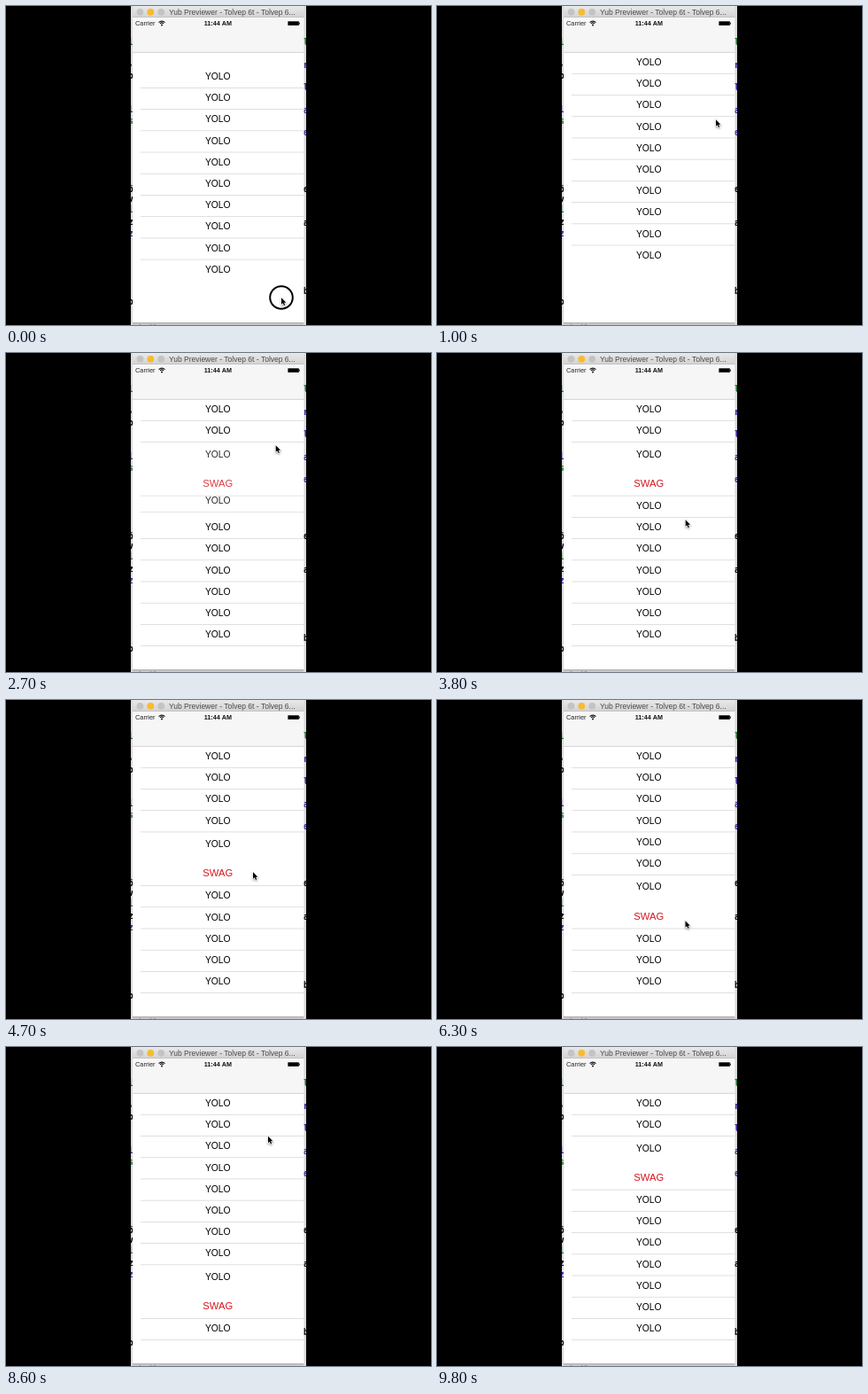
Animation of 480x360 px, one loop 10 s. Source, as an HTML page with a canvas:

```html
<!DOCTYPE html>
<html>
<head>
<meta charset="utf-8">
<style>
html, body { margin: 0; width: 100%; height: 100%; overflow: hidden; background: #000; }
canvas { display: block; }
</style>
</head>
<body>
<canvas id="stage" width="480" height="360"></canvas>
<script>
const ctx = document.getElementById('stage').getContext('2d');
const LOOP = 10000, FADE = 310;
const ROWS = 10, ROW_H = 24.22, EXTRA = 36.4, TABLE_TOP = 52.1;
const SANS = '"Liberation Sans", Arial, sans-serif';
const MONO = '"DejaVu Sans Mono", monospace';

// [time, row opened by the tap]
const taps = [[1300, 3], [2470, 2], [4200, 4], [5700, 6], [7350, 8], [8950, 2]];
// [time, x, y] of the pointer tip
const pointer = [
  [0, 311, 329], [250, 311, 329], [950, 315, 128], [1500, 315, 128], [2250, 304.7, 104],
  [3000, 304.7, 104], [3950, 279, 194], [4750, 279, 194], [5500, 280.5, 249],
  [6350, 280.5, 249], [7150, 284, 294], [7650, 284, 294], [8450, 296, 100.5],
  [9200, 296, 100.5], [9700, 348, 72]
];
// [letter, baseline, colour] of the editor showing beside the window
const GREEN = '#1f7a30', PURPLE = '#4a22a8', INK = '#000';
const leftCode = [['l', 44, GREEN], [',', 68, INK], ['o', 82, INK], ['l', 120, PURPLE],
  ['s', 133, GREEN], ['ö', 210, INK], ['v', 221, INK], ['l', 233, GREEN],
  ['z', 247, INK], ['z', 260, PURPLE], ['o', 337, INK]];
const rightCode = [['l', 44, GREEN], ['r', 70, PURPLE], ['l', 95, PURPLE], ['a', 121, PURPLE],
  ['e', 146, PURPLE], ['e', 210, INK], ['a', 248, INK], ['b', 325, INK]];

const clamp = v => Math.max(0, Math.min(1, v));
const ease = v => { v = clamp(v); return v * v * (3 - 2 * v); };

function rect(x, y, w, h, color) {
  ctx.fillStyle = color;
  ctx.fillRect(x, y, w, h);
}

function disc(x, y, r, color) {
  ctx.fillStyle = color;
  ctx.beginPath();
  ctx.arc(x, y, r, 0, 7);
  ctx.fill();
}

function text(str, x, y, size, color, align = 'center', weight = '', family = SANS) {
  ctx.font = `${weight} ${size}px ${family}`;
  ctx.textAlign = align;
  ctx.fillStyle = color;
  ctx.fillText(str, x, y);
}

function gradient(y0, y1, from, to) {
  const g = ctx.createLinearGradient(0, y0, 0, y1);
  g.addColorStop(0, from);
  g.addColorStop(1, to);
  return g;
}

function drawDesktop() {
  rect(141, 0, 198, 360, '#dadada');
  for (const [ch, y, color] of leftCode) text(ch, 144, y, 10.5, color, 'right', 'bold', MONO);
  for (const [ch, y, color] of rightCode) text(ch, 335.5, y, 10.5, color, 'left', 'bold', MONO);
  rect(143, 357, 193, 3, gradient(357, 360, '#b0b0b0', '#d0d0d0'));
  text('load it', 151, 364, 7, '#555', 'left');
}

function drawChrome() {
  rect(143, 0, 193.5, 13, gradient(0, 13, '#e9e9e9', '#d2d2d2'));
  rect(143, 12.5, 193.5, 0.5, '#b4b4b4');
  disc(151.5, 6.8, 3.9, '#c3c3c3');
  disc(163.3, 6.8, 3.9, '#f7bb2f');
  disc(175.2, 6.8, 3.9, '#c3c3c3');
  text('Yub Previewer - Tolvep 6t - Tolvep 6...', 184, 10, 8.5, '#4a4a4a', 'left');

  rect(143, 13, 193.5, 39, '#f6f6f6');
  rect(143, 51.9, 193.5, 0.7, '#c0c0c0');
  text('Carrier', 146, 22, 7.4, '#222', 'left');
  text('11:44 AM', 239.3, 22, 7.2, '#111', 'center', 'bold');

  ctx.strokeStyle = '#111';
  ctx.lineWidth = 1.1;
  for (const r of [2.9, 4.9]) {
    ctx.beginPath();
    ctx.arc(176, 22, r, -Math.PI * 0.75, -Math.PI * 0.25);
    ctx.stroke();
  }
  disc(176, 21.4, 1, '#111');
  rect(318.4, 17.3, 12.4, 4.6, '#000');
  rect(331.2, 18.6, 0.8, 2, '#000');
}

// One table cell: its text and the separator below it
function cell(top, expanded, alpha, line = true) {
  ctx.globalAlpha = alpha;
  text('YOLO', 239.2, top + (expanded ? 17 : 14.75), 10.3, '#000');
  if (expanded) text('SWAG', 239.2, top + 50.2, 11.2, '#d8141c');
  if (line) rect(152, top + ROW_H + (expanded ? EXTRA : 0) - 0.4, 184.5, 0.7, '#d2d2d2');
  ctx.globalAlpha = 1;
}

function drawTable(t) {
  rect(143, 52, 193.5, 305, '#fff');
  const done = taps.filter(tap => tap[0] <= t);
  const [start, open] = done.at(-1) || [0, -1];
  const closing = done.length > 1 ? done.at(-2)[1] : -1;
  const p = ease((t - start) / FADE);
  const leaving = (1 - p) ** 3;
  let y = TABLE_TOP + 16.1 * (1 - ease((t - 80) / 480));

  for (let row = 0; row < ROWS; row++) {
    const line = row < ROWS - 1 || open >= 0;
    if (row === open || row === closing) {
      cell(y, row === closing, leaving);
      cell(y, row === open, p);
    } else {
      cell(y, false, 1, line);
    }
    y += ROW_H;
    if (row === open) y += EXTRA * p;
    if (row === closing) y += EXTRA * (1 - p);
  }
}

function drawPointer(t) {
  const next = pointer.findIndex(k => k[0] > t);
  if (next < 0) return;
  const [t0, x0, y0] = pointer[next - 1], [t1, x1, y1] = pointer[next];
  const p = ease((t - t0) / (t1 - t0));
  const x = x0 + (x1 - x0) * p, y = y0 + (y1 - y0) * p;

  if (t < 150 || taps.some(([at]) => t >= at - 120 && t < at + 60)) {
    ctx.strokeStyle = '#000';
    ctx.lineWidth = 2;
    ctx.beginPath();
    ctx.arc(x, y, 12.8, 0, 7);
    ctx.stroke();
  }
  ctx.save();
  ctx.translate(x, y);
  const arrow = new Path2D('M0 .3V7.8L1.7 6.3L3 9.1L4.2 8.6L3 5.8H5.4Z');
  ctx.shadowColor = 'rgba(0,0,0,.4)';
  ctx.shadowBlur = 2;
  ctx.shadowOffsetY = 1;
  ctx.lineWidth = 1.2;
  ctx.strokeStyle = '#fff';
  ctx.stroke(arrow);
  ctx.shadowColor = 'transparent';
  ctx.fillStyle = '#000';
  ctx.fill(arrow);
  ctx.restore();
}

function frame(now) {
  const t = now % LOOP;
  ctx.save();
  ctx.beginPath();
  ctx.rect(141, 0, 198, 360);
  ctx.clip();
  drawDesktop();
  drawTable(t);
  drawChrome();
  drawPointer(t);
  ctx.restore();
  requestAnimationFrame(frame);
}
requestAnimationFrame(frame);
</script>
</body>
</html>
```
